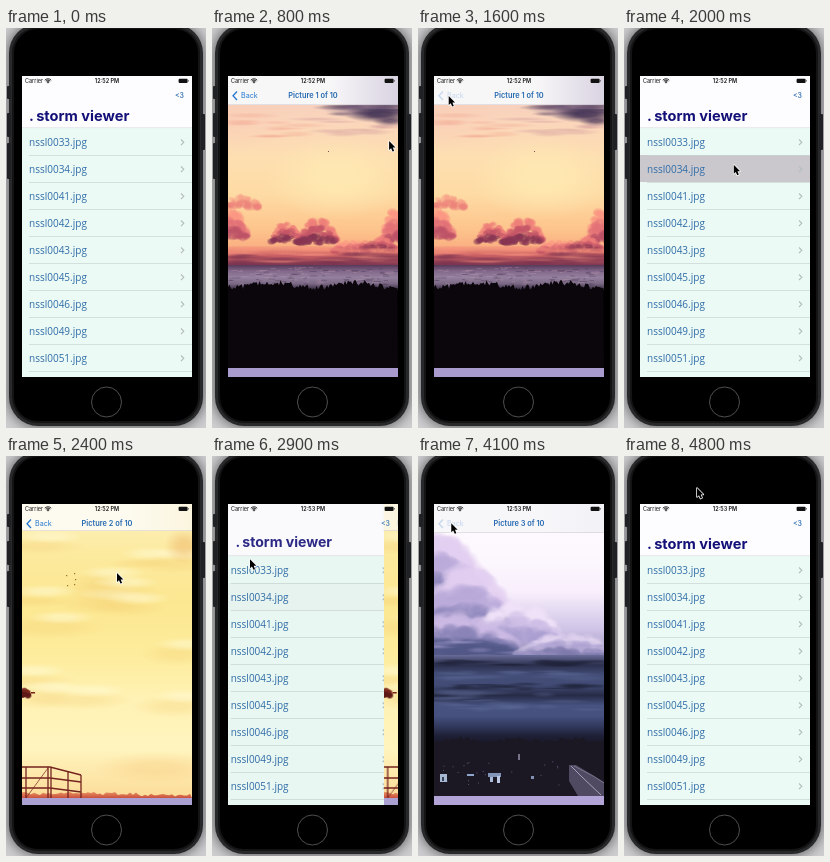
These frames come from a looping animation (200x400 px, 4900 ms). An HTML page with a canvas:

```html
<!DOCTYPE html>
<html lang="en">
<head>
<meta charset="utf-8">
<title>Storm viewer demo</title>
<style>
  html, body { margin: 0; width: 100%; height: 100%; overflow: hidden; background: #aaa; }
  canvas { display: block; width: 200px; height: 400px; }
</style>
</head>
<body>
<canvas id="stage" width="200" height="400"></canvas>
<script>
const ctx = document.getElementById('stage').getContext('2d');
const LOOP = 4900, STEP = 100;
const L = 16, T = 48, W = 170, H = 301;
const UI = 'Inter, "Liberation Sans", sans-serif';
const LIST = '"Open Sans", "Noto Sans", sans-serif';
const BLUE = '#2368b0';
const files = ['0033', '0034', '0041', '0042', '0043', '0045', '0046', '0049', '0051'];

// One visit per picture: push start, pop start
const visits = [
  { push: 450, pop: 1650 },
  { push: 2000, pop: 2700 },
  { push: 3200, pop: 4150 }
];
const PUSH = 350, POP = 300;

// Pointer path: time, x, y
const path = [
  [100, 204, 96], [350, 178, 113], [900, 177, 113], [1100, 150, 108], [1450, 32, 68],
  [1700, 30, 68], [1900, 108, 136], [2150, 113, 138], [2400, 111, 117], [2600, 36, 69],
  [2800, 32, 67], [3050, 49, 170], [3300, 51, 172], [3600, 52, 160], [3900, 34, 68],
  [4200, 33, 67], [4500, 62, 48], [4700, 73, 32], [4900, 73, 32]
];

const clamp = v => Math.max(0, Math.min(1, v));
const easeOut = v => 1 - Math.pow(1 - clamp(v), 2.25);

function random(seed) {
  return () => (seed = (seed * 16807) % 2147483647) / 2147483647;
}

function box(g, x, y, w, h, fill) {
  g.fillStyle = fill;
  g.fillRect(x, y, w, h);
}

function rounded(g, x, y, w, h, r, fill) {
  g.beginPath();
  g.roundRect(x, y, w, h, r);
  g.fillStyle = fill;
  g.fill();
}

function poly(g, pts, fill) {
  g.beginPath();
  pts.forEach(([x, y]) => g.lineTo(x, y));
  g.closePath();
  g.fillStyle = fill;
  g.fill();
}

function fade(g, y0, y1, ...colors) {
  const f = g.createLinearGradient(0, y0, 0, y1);
  colors.forEach((c, i) => f.addColorStop(i / (colors.length - 1), c));
  return f;
}

function soft(g, x, y, rx, ry, rgb, alpha, core = 0.3) {
  g.save();
  g.translate(x, y);
  g.scale(rx, ry);
  const f = g.createRadialGradient(0, 0, 0, 0, 0, 1);
  f.addColorStop(0, `rgba(${rgb},${alpha})`);
  f.addColorStop(core, `rgba(${rgb},${alpha})`);
  f.addColorStop(1, `rgba(${rgb},0)`);
  g.fillStyle = f;
  g.fillRect(-1, -1, 2, 2);
  g.restore();
}

// Cumulus: a dome of puffs on a flat base, shaded from the lit top down
function cumulus(g, rnd, x, base, w, h, size, tones, alpha = 0.6) {
  const n = Math.ceil(w * h / size) + 14;
  for (let i = 0; i < n; i++) {
    const v = 1 - i / n, u = rnd() * 2 - 1;
    const r = size * (0.45 + rnd() * 0.6);
    const tone = tones[Math.floor((1 - v) * tones.length * 0.999)];
    soft(g, x + u * w, base - v * h * (1 - u * u * 0.8), r * 1.25, r, tone, alpha, 0.55);
  }
}

// Thin wisps scattered over a strip
function wisps(g, rnd, n, x, y, w, h, rgb, alpha) {
  for (let i = 0; i < n; i++)
    soft(g, x + rnd() * w, y + rnd() * h, 12 + rnd() * 22, 1 + rnd() * 2.5, rgb, alpha);
}

function text(str, x, y, font, color, align = 'left') {
  ctx.font = font;
  ctx.fillStyle = color;
  ctx.textAlign = align;
  ctx.textBaseline = 'alphabetic';
  ctx.fillText(str, x, y);
}

function line(g, pts, color, width) {
  g.beginPath();
  pts.forEach(([x, y]) => g.lineTo(x, y));
  g.strokeStyle = color;
  g.lineWidth = width;
  g.stroke();
}

function sunset(g) {
  const rnd = random(71);
  box(g, L, T, W, 190, fade(g, 60, 237, '#f3ccc0', '#fbd6ba', '#fddfb0', '#fedba4', '#fdc48c', '#f79a78'));
  soft(g, 125, 150, 70, 42, '255,236,180', 0.65);
  soft(g, 24, 92, 60, 30, '250,205,180', 0.5);
  wisps(g, rnd, 12, 20, 82, 70, 34, '240,160,140', 0.3);
  wisps(g, rnd, 8, 100, 90, 86, 16, '205,150,155', 0.35);
  soft(g, 160, 78, 52, 14, '110,88,124', 0.75);
  soft(g, 168, 86, 36, 9, '62,46,80', 0.8);
  soft(g, 178, 93, 18, 5, '80,58,92', 0.7);
  wisps(g, rnd, 10, 110, 77, 70, 12, '70,52,88', 0.35);
  const rose = ['250,150,130', '226,112,118', '188,80,102'];
  const plum = ['238,126,120', '196,84,102', '134,52,82'];
  cumulus(g, rnd, 30, 180, 18, 12, 4, ['246,160,135', '236,130,122'], 0.5);
  cumulus(g, rnd, 18, 210, 18, 28, 5, rose, 0.55);
  cumulus(g, rnd, 74, 214, 16, 18, 4, plum);
  cumulus(g, rnd, 105, 215, 19, 24, 4.5, plum);
  cumulus(g, rnd, 184, 216, 14, 34, 5, rose);
  cumulus(g, rnd, 140, 224, 20, 10, 3.5, rose);
  cumulus(g, rnd, 165, 222, 18, 12, 4, plum, 0.5);
  box(g, L, 218, W, 19, fade(g, 216, 237, 'rgba(230,110,105,0)', 'rgba(190,72,92,.7)', 'rgba(112,44,76,.9)'));
  wisps(g, rnd, 22, L, 220, W, 14, '248,146,124', 0.4);
  wisps(g, rnd, 18, L, 226, W, 10, '120,48,78', 0.45);
  box(g, L, 237, W, 25, fade(g, 237, 262, '#56385a', '#82688a', '#94809e', '#7a6884', '#30253a'));
  for (let i = 0; i < 130; i++)
    box(g, L + rnd() * W, 239 + rnd() * 18, 2 + rnd() * 6, 0.8,
      rnd() < 0.5 ? 'rgba(196,160,182,.35)' : 'rgba(56,40,68,.4)');
  const land = [[L, 340]];
  for (let x = L; x <= L + W; x += 1.5)
    land.push([x, 254 + Math.sin(x / 13) * 2.5 + rnd() * 6]);
  land.push([L + W, 340]);
  poly(g, land, '#0a060b');
  box(g, 116, 123, 1, 1, '#75505a');
  box(g, L, 340, W, 9, '#a99bce');
}

function yellowSky(g) {
  const rnd = random(29);
  box(g, L, T, W, 294, fade(g, 48, 342, '#fdf2c4', '#fcea9e', '#fce791', '#fdec9b', '#fff2b4', '#fff4be', '#fcdc98'));
  for (let i = 0; i < 14; i++) {
    const x = L + rnd() * W, y = 90 + rnd() * 165;
    soft(g, x, y, 30 + rnd() * 30, 5 + rnd() * 8, '242,200,108', 0.26);
    soft(g, x + 12, y - 10, 34, 7, '255,250,212', 0.5);
  }
  soft(g, 178, 90, 20, 18, '235,170,90', 0.4);
  soft(g, 150, 312, 65, 16, '248,205,130', 0.4);
  for (const [x, y] of [[60, 119], [68, 117], [69, 123], [61, 129], [68, 128]])
    box(g, x, y, 1.2, 1.2, '#9b6b32');
  const hill = [[L, 342]];
  for (let x = L; x <= L + W; x += 3) hill.push([x, 336 + rnd() * 3 + (x > 130 ? 1.5 : 0)]);
  hill.push([L + W, 342]);
  poly(g, hill, fade(g, 335, 342, '#ee9a66', '#c8503e'));
  // tree top and railing
  cumulus(g, rnd, 19, 240, 4, 6, 4, ['120,36,28', '94,25,22'], 0.9);
  box(g, 25, 236, 4, 1.5, '#76221d');
  const rail = '#74231f';
  for (const y of [311, 322, 332])
    line(g, [[L, y], [44, y], [75, y + (y < 320 ? 8 : 4)]], rail, 1.3);
  for (const x of [20, 42, 45, 62, 75])
    line(g, [[x, x < 50 ? 311 : 311 + (x - 44) * 0.26], [x, 342]], rail, 1.3);
  line(g, [[20, 342], [42, 312]], rail, 0.7);
  box(g, L, 342, W, 7, '#aaa0d1');
}

function storm(g) {
  const rnd = random(113);
  box(g, L, T, W, 164, fade(g, 60, 212, '#fdf9fe', '#fdf8fe', '#f8effc', '#cfc3e6', '#7c7ba8'));
  const lilac = ['226,206,240', '186,170,218', '146,138,190'];
  const blue = ['204,186,228', '136,130,182', '84,90,138'];
  cumulus(g, rnd, 26, 140, 34, 60, 10, lilac, 0.45);
  cumulus(g, rnd, 48, 172, 44, 60, 10, lilac, 0.4);
  cumulus(g, rnd, 98, 186, 42, 38, 8, ['240,226,248', '206,190,230', '170,158,208'], 0.4);
  cumulus(g, rnd, 36, 200, 62, 40, 9, blue, 0.4);
  cumulus(g, rnd, 150, 202, 50, 22, 7, ['226,212,240', '180,168,212', '124,120,170'], 0.4);
  soft(g, 40, 194, 80, 14, '78,86,134', 0.6);
  wisps(g, rnd, 16, L, 184, W, 16, '168,158,208', 0.35);
  box(g, L, 199, W, 91, fade(g, 199, 290,
    '#686c98', '#2c304e', '#434e78', '#414b74', '#262b46', '#465280', '#465180', '#323a5e', '#1e2036', '#191626'));
  wisps(g, rnd, 14, L, 204, W, 5, '30,32,54', 0.5);
  wisps(g, rnd, 18, L, 213, W, 10, '92,104,150', 0.3);
  wisps(g, rnd, 14, L, 228, W, 5, '28,32,54', 0.45);
  wisps(g, rnd, 22, L, 236, W, 18, '98,110,156', 0.28);
  const land = [[L, 340]];
  for (let x = L; x <= L + W; x += 2)
    land.push([x, 286 + Math.sin(x / 9) * 2 - rnd() * 4]);
  land.push([L + W, 340]);
  poly(g, land, '#1c1823');
  poly(g, [[151, 309], [158, 309], [186, 326], [186, 340], [160, 340], [151, 325]], '#4f4a61');
  line(g, [[153, 310], [164, 321], [183, 339]], '#c0b4d0', 0.8);
  line(g, [[156, 310], [175, 320], [186, 327]], '#8e849f', 0.7);
  for (let i = 0; i < 22; i++)
    box(g, L + rnd() * 132, 305 + rnd() * 24, 1, 1, 'rgba(150,150,190,.5)');
  box(g, 22, 318, 7, 8, '#a7b9d2');
  box(g, 24, 321, 2, 4, '#3b4358');
  box(g, 49, 318, 7, 2, '#8ea6cc');
  box(g, 70, 317, 13, 4, '#8294b8');
  box(g, 72, 321, 3, 5, '#a9bcdd');
  box(g, 79, 320, 3, 7, '#bcc8e4');
  box(g, 100, 298, 2, 6, '#777286');
  box(g, 113, 320, 3, 3, '#8290b2');
  box(g, L, 340, W, 9, '#b2a4d6');
}

const photos = [sunset, yellowSky, storm].map(paint => {
  const c = document.createElement('canvas');
  c.width = W;
  c.height = H;
  const g = c.getContext('2d');
  g.translate(-L, -T);
  paint(g);
  return c;
});

function phone() {
  box(ctx, 0, 0, 200, 400, '#cfced1');
  ctx.save();
  ctx.shadowColor = 'rgba(0,0,0,.65)';
  ctx.shadowBlur = 14;
  rounded(ctx, 3, -4, 194, 402, 29, '#28292b');
  ctx.restore();
  for (const [y, h] of [[58, 13], [85, 24], [115, 36]]) rounded(ctx, 1, y, 4, h, 1, '#202124');
  rounded(ctx, 195, 86, 4, 36, 1, '#202124');
  rounded(ctx, 6, -1, 188, 396, 26, '#141415');
  rounded(ctx, 8, 1, 184, 392, 24, '#000');
  ctx.beginPath();
  ctx.arc(100.5, 374, 15, 0, Math.PI * 2);
  ctx.strokeStyle = '#59595b';
  ctx.lineWidth = 0.9;
  ctx.stroke();
}

function list(p, row, glow) {
  ctx.save();
  ctx.translate(-0.3 * W * p, 0);
  box(ctx, L, 100, W, 249, '#ebfaf4');
  if (glow > 0) {
    ctx.globalAlpha = glow;
    box(ctx, L, 100 + row * 27, W, 27, '#cac8cd');
    ctx.globalAlpha = 1;
  }
  files.forEach((n, i) => {
    const y = 100 + i * 27;
    text(`nssl${n}.jpg`, 23, y + 17.5, '10px ' + LIST, '#2f6ca8');
    line(ctx, [[175, y + 11.5], [177.8, y + 14.3], [175, y + 17]], '#b4bebd', 1.1);
    box(ctx, 23, y + 27, W - 7, 0.7, '#c9d6d1');
  });
  ctx.restore();
  box(ctx, L, T, W, 52, '#fdfcfe');
  box(ctx, L, 99.5, W, 0.6, '#d6dbdc');
  if (p > 0) box(ctx, L, T, W, H, `rgba(25,10,35,${0.12 * p})`);
}

function detail(p, pic) {
  const dx = W * (1 - p);
  ctx.drawImage(photos[pic], L + dx, T);
  const tops = [['#f8f7f8', '#d9d3e2'], ['#fdfbf0', '#fbf5df'], ['#f7f6f9', '#f2f1f5']][pic];
  const f = ctx.createLinearGradient(L, 0, L + W, 0);
  f.addColorStop(0, tops[0]);
  f.addColorStop(0.6, tops[0]);
  f.addColorStop(1, tops[1]);
  const h = pic === 1 ? 27 : 29;
  box(ctx, L + dx, T, W, h, f);
  box(ctx, L + dx, T + h - 0.5, W, 0.5, 'rgba(120,110,125,.35)');
}

function bar(p, pic, pressed) {
  if (p < 1) {
    ctx.globalAlpha = clamp(1 - 1.25 * p);
    text('.\u2009storm viewer', 23 + 5 * p, 93 - 20 * p, `700 ${14.6 * (1 - 0.43 * p)}px ${UI}`, '#131078');
    ctx.globalAlpha = clamp(1 - p);
    text('<3', 178, 70, '500 7px ' + UI, BLUE, 'right');
  }
  if (p > 0) {
    ctx.globalAlpha = clamp(p * 1.5);
    text(`Picture ${pic + 1} of 10`, 101 + 0.7 * W * (1 - p), 70, '600 7.4px ' + UI, BLUE, 'center');
    ctx.globalAlpha = clamp((p - 0.6) / 0.4) * (pressed ? 0.24 : 1);
    line(ctx, [[25, 63.5], [21, 67.7], [25, 72]], '#2377d0', 1.3);
    text('Back', 29, 70.3, '400 7.2px ' + UI, '#2377d0');
  }
  ctx.globalAlpha = 1;
}

function status(t) {
  text('Carrier', 19, 55, '5.5px ' + UI, '#111');
  ctx.strokeStyle = '#111';
  ctx.lineWidth = 0.9;
  for (const r of [1.6, 3, 4.4]) {
    ctx.beginPath();
    ctx.arc(42, 55.2, r, -Math.PI * 0.76, -Math.PI * 0.24);
    ctx.stroke();
  }
  box(ctx, 41.4, 54, 1.2, 1.2, '#111');
  text(t < 2900 ? '12:52 PM' : '12:53 PM', 101, 55, '600 5.5px ' + UI, '#111', 'center');
  rounded(ctx, 172.6, 50.7, 9, 4.3, 1, '#111');
  box(ctx, 182, 52, 0.7, 1.6, '#555');
}

function pointer(t) {
  if (t < path[0][0]) return;
  const i = path.findIndex(k => k[0] > t);
  const [t0, x0, y0] = path[i - 1], [t1, x1, y1] = path[i];
  const u = (t - t0) / (t1 - t0), s = u * u * (3 - 2 * u);
  ctx.save();
  ctx.translate(x0 + (x1 - x0) * s, y0 + (y1 - y0) * s);
  ctx.beginPath();
  [[0, 0], [0, 9], [2, 7.2], [3.5, 10.6], [5.1, 9.9], [3.7, 6.6], [6.4, 6.5]]
    .forEach(([x, y]) => ctx.lineTo(x, y));
  ctx.closePath();
  ctx.lineJoin = 'round';
  ctx.strokeStyle = '#fff';
  ctx.lineWidth = 1.5;
  ctx.stroke();
  ctx.fillStyle = '#000';
  ctx.fill();
  ctx.restore();
}

function draw(t) {
  let pic = visits.findIndex(v => t < v.pop + POP + 50);
  if (pic < 0) pic = visits.length - 1;
  const { push, pop } = visits[pic];
  const p = t < pop ? easeOut((t - push) / PUSH) : 1 - easeOut((t - pop) / POP);
  const glow = t < push - 60 ? 0 : t < pop ? 1 : p;
  const pressed = t >= pop - 60;

  phone();
  ctx.save();
  ctx.beginPath();
  ctx.rect(L, T, W, H);
  ctx.clip();
  list(p, pic, glow);
  if (p > 0) detail(p, pic);
  bar(p, pic, pressed);
  status(t);
  ctx.restore();
  pointer(t);
}

const start = performance.now();
function tick() {
  const t = (performance.now() - start) % LOOP;
  draw(Math.floor(t / STEP) * STEP);
  requestAnimationFrame(tick);
}
tick();
</script>
</body>
</html>
```
